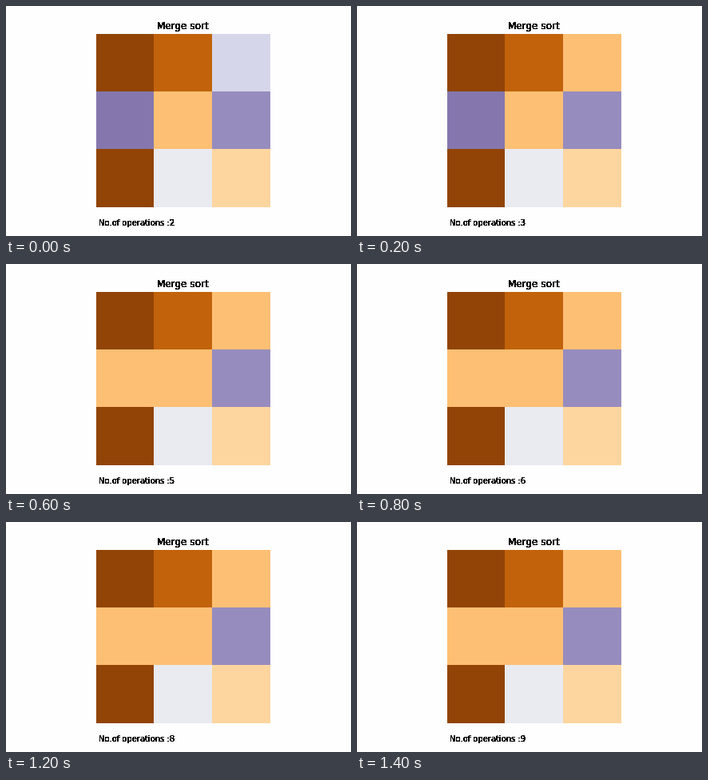
A matplotlib script for the animation above (1.6 s loop, 432 by 288 pixels).

```python
import numpy as np
import matplotlib.pyplot as plt
from matplotlib.animation import FuncAnimation
from matplotlib.colors import to_rgb

WIDTH, HEIGHT, DPI = 432, 288, 72
FRAMES, INTERVAL = 8, 200
FIRST_COUNT = 2

BROWN, RUST, AMBER, SAND = "#924407", "#c2630b", "#fdbf73", "#fdd59f"
PALE, LAVENDER, LILAC, PURPLE = "#eaebf1", "#d5d6e9", "#978cbe", "#8577ad"

START = [[BROWN, RUST, LAVENDER],
         [PURPLE, AMBER, LILAC],
         [BROWN, PALE, SAND]]
# step at which a cell is overwritten: (step, row, column, colour)
WRITES = [(1, 0, 2, AMBER), (2, 1, 0, AMBER)]

COLUMN_EDGES = [113, 185, 258, 331]
ROW_EDGES = [35, 107, 179, 252]


def cell_colors(step):
    grid = np.array([[to_rgb(c) for c in row] for row in START])
    for when, row, col, color in WRITES:
        if step >= when:
            grid[row, col] = to_rgb(color)
    return grid


def solid(image, dpi):
    """Turn soft glyph edges into full black pixels."""
    image = image.copy()
    image[..., :3] = 0
    image[..., 3] = image[..., 3] > 0.08
    return image, 0, 0


def label(x, y, text, size, **kwargs):
    return ax.text(x, y, text, fontsize=size, family="DejaVu Sans",
                   agg_filter=solid, **kwargs)


fig = plt.figure(figsize=(WIDTH / DPI, HEIGHT / DPI), dpi=DPI, facecolor="#fefefe")
ax = fig.add_axes([0, 0, 1, 1])
ax.axis("off")

mesh = ax.pcolormesh(COLUMN_EDGES, ROW_EDGES, cell_colors(0),
                     antialiased=False, edgecolors="none")
ax.set(xlim=(0, WIDTH), ylim=(HEIGHT, 0))
label(221.4, 28.56, "Merge sort", 12, ha="center")
counter = label(116.3, 275, "", 10)


def update(step):
    mesh.set_array(cell_colors(step))
    counter.set_text(f"No.of operations :{FIRST_COUNT + step}")
    return mesh, counter


anim = FuncAnimation(fig, update, frames=FRAMES, interval=INTERVAL,
                     repeat=True, repeat_delay=0)
plt.show()
```
